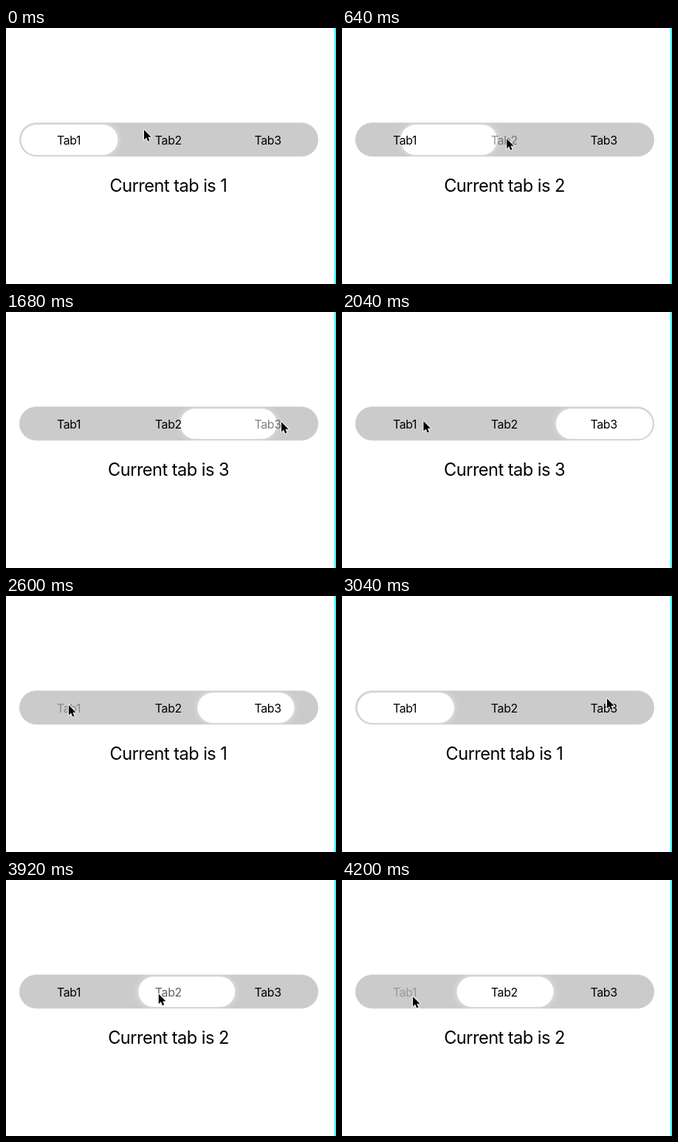
Recreate the animation shown at these times as an HTML page. Size 447x347 px, loop 4320 ms.

```html
<!DOCTYPE html>
<html lang="en">
<head>
<meta charset="utf-8">
<title>Sliding tabs</title>
<style>
  html, body { margin: 0; width: 100%; height: 100%; overflow: hidden; background: #fff; }
  svg { display: block; width: 100vw; height: 100vh; }
  text { font-family: Inter, "Liberation Sans", sans-serif; text-anchor: middle; letter-spacing: -0.023em; }
  .tab { font-size: 15.9px; }
  #status { font-size: 23.6px; }
</style>
</head>
<body>
<svg viewBox="0 0 447 347">
  <defs>
    <filter id="glow" x="-20%" y="-60%" width="140%" height="220%">
      <feGaussianBlur stdDeviation="4.5"/>
    </filter>
    <filter id="shade" x="-50%" y="-50%" width="200%" height="200%">
      <feGaussianBlur stdDeviation="0.8"/>
    </filter>
    <rect id="thumb" y="131" width="131" height="41" rx="20.5" fill="#fff"/>
    <path id="arrow" d="M0 0V14.3L3.3 11.2L5.5 16.4L8 15.3L5.8 10.3H10.3Z"/>
  </defs>
  <rect width="447" height="347" fill="#fff"/>
  <rect x="444.6" width="2.4" height="347" fill="#42f5fc"/>
  <rect x="18" y="128.3" width="405" height="46" rx="23" fill="#cbcbcb"/>
  <g id="pill">
    <use href="#thumb" opacity="0.55" filter="url(#glow)"/>
    <use href="#thumb"/>
  </g>
  <g id="labels"></g>
  <text id="status" x="220" y="221.8"></text>
  <g id="cursor">
    <use href="#arrow" y="1" opacity="0.3" filter="url(#shade)"/>
    <use href="#arrow" stroke="#fff" stroke-width="2" stroke-linejoin="round"/>
    <use href="#arrow"/>
  </g>
</svg>
<script>
const LOOP = 4320, STEP = 40;
const PILL_X = 20.5, PITCH = 134.75, LABEL_X = 85.1;
const DIM = 0.25, FADE = 350, SPRING = 0.0185;

const taps = [
  { tab: 1, down: 480, up: 560 },
  { tab: 2, down: 1400, up: 1571 },
  { tab: 0, down: 2480, up: 2569 },
  { tab: 2, down: 3080, up: 3130 },
  { tab: 1, down: 3700, up: 3750 },
  { tab: 0, down: 4200, up: LOOP }
];

// where the pointer rests and when it gets there
const stops = [
  { at: 0, x: 187, y: 138 },
  { at: 440, x: 223, y: 150 },
  { at: 1000, x: 371, y: 145 },
  { at: 1200, x: 373, y: 149 },
  { at: 2120, x: 85, y: 148 },
  { at: 3040, x: 359, y: 139 },
  { at: 3520, x: 261.5, y: 165 },
  { at: 3690, x: 225, y: 154 },
  { at: 4120, x: 96, y: 158 }
];

const byId = id => document.getElementById(id);
const pill = byId("pill"), statusLine = byId("status"), cursor = byId("cursor");

const labels = [0, 1, 2].map(i => {
  const el = document.createElementNS("http://www.w3.org/2000/svg", "text");
  el.setAttribute("class", "tab");
  el.setAttribute("x", LABEL_X + i * PITCH);
  el.setAttribute("y", 157.6);
  el.textContent = `Tab${i + 1}`;
  byId("labels").append(el);
  return el;
});

const mix = (a, b, k) => a + (b - a) * k;
const clamp = k => Math.min(Math.max(k, 0), 1);
const smooth = k => k * k * (3 - 2 * k);
const spring = t => 1 - (1 + SPRING * t) * Math.exp(-SPRING * t);

// longer trips take longer
function pointAt(t) {
  let { x, y } = stops[0];
  for (const stop of stops.slice(1)) {
    const time = 120 + 1.1 * Math.hypot(stop.x - x, stop.y - y);
    const k = smooth(clamp(1 + (t - stop.at) / time));
    x = mix(x, stop.x, k);
    y = mix(y, stop.y, k);
    if (k < 1) break;
  }
  return `${x} ${y}`;
}

function draw(t) {
  let place = 0, current = 0;
  const alpha = [1, 1, 1];
  for (const { tab, down, up } of taps) {
    if (t < down) break;
    alpha[tab] = mix(DIM, 1, clamp((t - up) / FADE));
    if (t >= up) {
      place = mix(current, tab, spring(t - up));
      current = tab;
    }
  }
  pill.setAttribute("transform", `translate(${PILL_X + PITCH * place} 0)`);
  labels.forEach((el, i) => el.setAttribute("opacity", alpha[i]));
  statusLine.textContent = `Current tab is ${current + 1}`;
  cursor.setAttribute("transform", `translate(${pointAt(t)}) scale(0.94)`);
}

const start = performance.now();
function tick() {
  const t = (performance.now() - start) % LOOP;
  draw(Math.floor(t / STEP) * STEP);
  requestAnimationFrame(tick);
}
draw(0);
requestAnimationFrame(tick);
</script>
</body>
</html>
```
